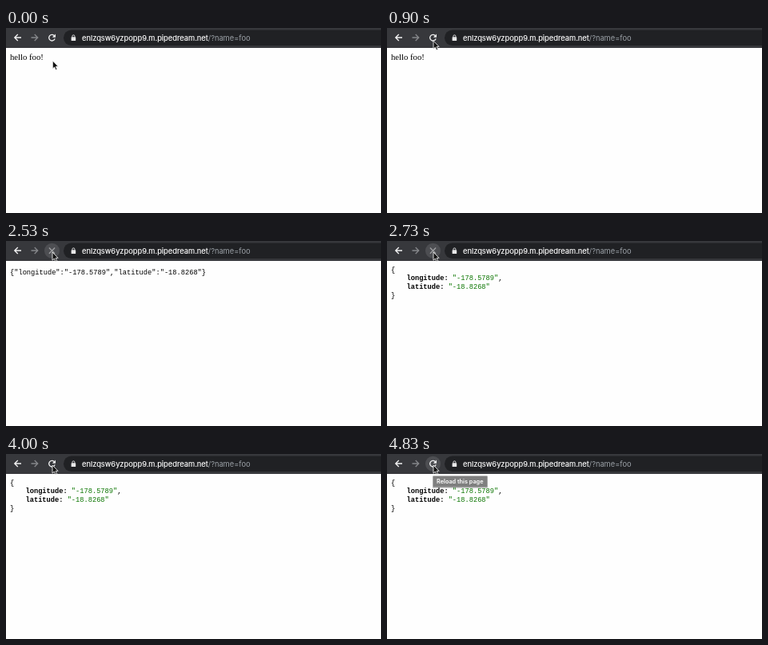
Animation of 469x232 px, one loop 5130 ms. Source, as an HTML page:

```html
<!DOCTYPE html>
<html lang="en">
<head>
<meta charset="utf-8">
<title>Page reload</title>
<style>
  html, body { margin: 0; width: 100%; height: 100%; overflow: hidden; background: #fefefe; }
  svg { display: block; width: 100%; height: 100%; }
  text { white-space: pre; }
  .ui { font-family: Inter, Roboto, sans-serif; }
  .url { font-size: 9.3px; }
  .serif { font: 10.7px "Liberation Serif", serif; }
  .mono { font: 8.7px "Liberation Mono", monospace; }
  .key { font-weight: bold; }
  .value { fill: #0b7500; }
  .icon { fill: none; stroke: #f1f1f2; stroke-width: 1.35; }
</style>
</head>
<body>
<svg viewBox="0 0 469 232">
  <rect width="469" height="25" fill="#37383c"/>
  <rect x="72" y="2.5" width="420" height="19.5" rx="9.75" fill="#202124"/>

  <path class="icon" d="M19 12H11M14.8 8L10.8 12L14.8 16"/>
  <path class="icon" d="M31.5 12H39.5M35.7 8L39.7 12L35.7 16" style="stroke:#85868a"/>
  <circle id="hover" cx="57.5" cy="12.3" r="9.5" fill="#4d4e52"/>
  <g id="reload">
    <path class="icon" d="M60.3 9.6A3.8 3.8 0 1 0 61.1 13.4"/>
    <path d="M62 7.6V11.8H57.8Z" fill="#f1f1f2"/>
  </g>
  <path id="stop" class="icon" d="M53.9 8.6L61.1 15.8M61.1 8.6L53.9 15.8"/>

  <rect x="81.6" y="11.3" width="5.6" height="4.8" rx=".7" fill="#e8e8e9"/>
  <path class="icon" d="M82.9 11.5V10.3A1.5 1.5 0 0 1 85.9 10.3V11.5" style="stroke-width:.9"/>
  <text class="ui url" x="95" y="15.8" fill="#fff" stroke="#fff" stroke-width=".15">enlzqsw6yzpopp9.m.pipedream.net<tspan fill="#9aa0a6" stroke="none">/?name=foo</tspan></text>

  <text id="hello" class="serif" x="5" y="40">hello foo!</text>
  <text id="raw" class="mono" x="5" y="42">{"longitude":"-178.5789","latitude":"-18.8268"}</text>
  <g id="tree" class="mono">
    <text x="5" y="38.6">{</text>
    <text x="24.5" y="49.2"><tspan class="key">longitude:</tspan> <tspan class="value">"-178.5789"</tspan>,</text>
    <text x="24.5" y="60.4"><tspan class="key">latitude:</tspan> <tspan class="value">"-18.8268"</tspan></text>
    <text x="5" y="71.4">}</text>
  </g>

  <g id="tip">
    <rect x="57" y="28" width="69" height="15" fill="#000" opacity=".18"/>
    <rect x="57.5" y="27.5" width="68" height="14" fill="#7f7f7f"/>
    <text class="ui" x="62" y="37" font-size="7.3" font-weight="600" fill="#fff">Reload this page</text>
  </g>

  <path id="cursor" d="M0 0V10.2L2.3 8L3.9 11.6L5.6 10.9L4.1 7.3H7.1Z" fill="#111" stroke="#fff" stroke-width=".8" stroke-linejoin="round"/>
</svg>
<script>
const LOOP = 5130;
const el = id => document.getElementById(id);
const show = (id, on) => el(id).style.opacity = +on;
const ramp = (t, a, b) => Math.min(1, Math.max(0, (t - a) / (b - a)));

function draw(t) {
  // The pointer glides up to the reload button and settles
  const move = t < 730 ? 0 : 1 - (1 - ramp(t, 690, 1060)) ** 3;
  el('cursor').setAttribute('transform', `translate(${58.3 - .3 * move} ${41 - 27 * move})`);

  const loading = t >= 2130 && t < 3860;
  show('hover', t < 3860 ? ramp(t, 930, 1060) : t >= 4600);
  show('reload', !loading);
  show('stop', loading && 1 - .5 * ramp(t, 2460, 2530));

  show('hello', t < 2460);
  show('raw', t >= 2460 && t < 2560);
  show('tree', t >= 2560);
  show('tip', t >= 4830);
}

function frame() {
  draw(performance.now() % LOOP);
  requestAnimationFrame(frame);
}
frame();
</script>
</body>
</html>
```
